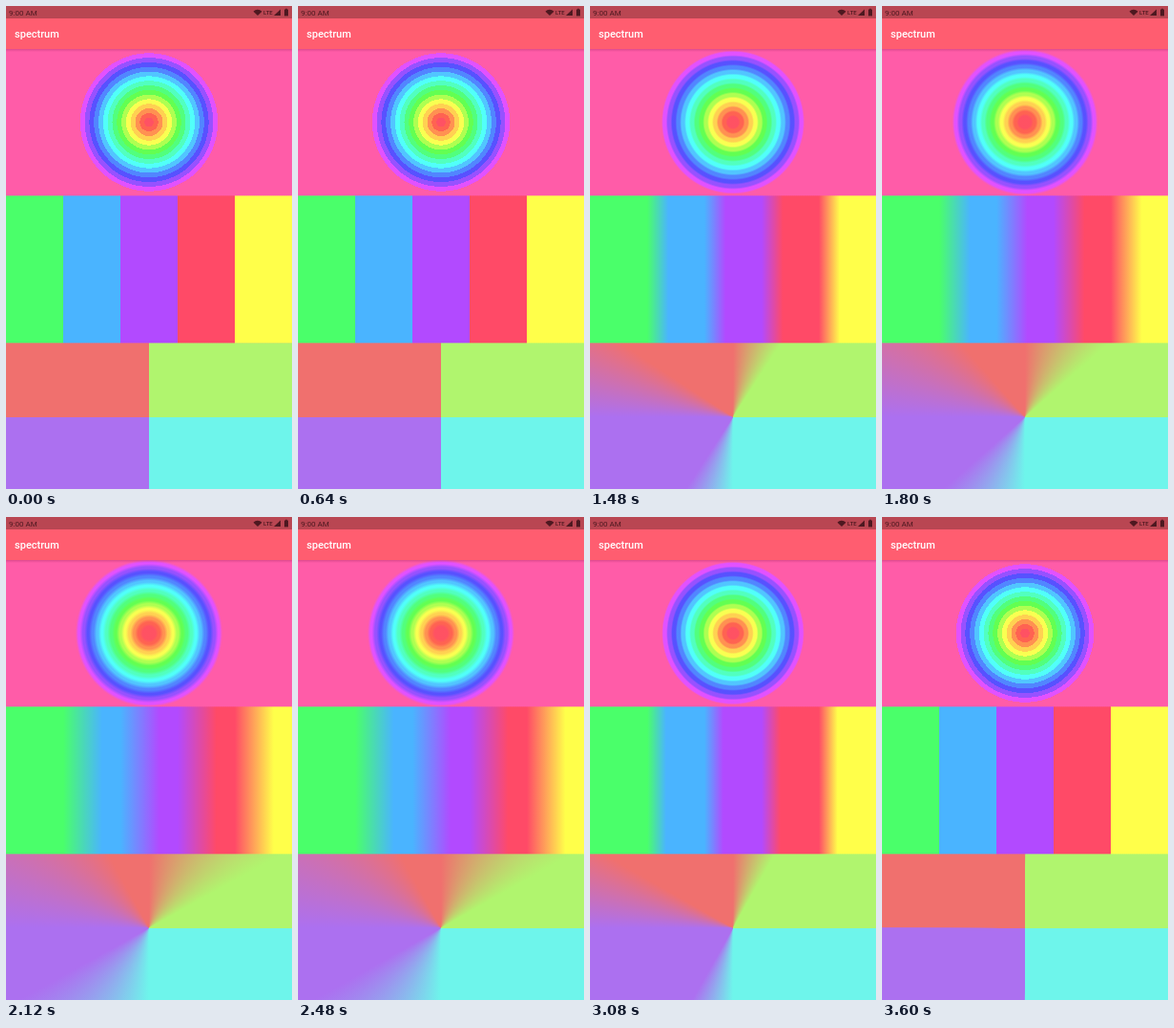
These frames come from a looping animation (300 by 505 pixels, 3.68 s). An HTML page with a canvas:

```html
<!DOCTYPE html>
<html lang="en">
<head>
<meta charset="utf-8">
<title>spectrum</title>
<style>
  html, body { margin: 0; width: 100%; height: 100%; overflow: hidden; background: #ff5ca8; }
  canvas { display: block; width: 300px; height: 505px; }
</style>
</head>
<body>
<canvas id="stage"></canvas>
<script>
const W = 300, H = 505, LOOP = 3680, STEP = 40;
const canvas = document.getElementById('stage');
const ctx = canvas.getContext('2d');
const dpr = window.devicePixelRatio || 1;
canvas.width = W * dpr;
canvas.height = H * dpr;
ctx.scale(dpr, dpr);

const PINK = '#ff5ca8';
const BANDS = ['#4aff6a', '#4ab4ff', '#b24aff', '#ff4a67', '#ffff4a'];
const SECTORS = ['#6ef5eb', '#ac70f0', '#f0706e', '#b0f56e'];
const HUES = [354, 6, 22, 44, 62, 88, 114, 135, 158, 178, 200, 222, 242, 264, 290];
const RINGS = [...HUES.map(h => `hsl(${h}, 100%, 66%)`), PINK];

// [ms, smoothness]: 0 is hard edges, 1 is fully blended
const KEYS = [[0, 0], [880, 0], [1040, .06], [1480, .37], [2120, .68],
              [2400, .7], [2760, .53], [3080, .33], [3600, .005], [LOOP, 0]];

function slope(i) {
  if (i < 2 || i > KEYS.length - 3) return 0;
  const [a, b] = [KEYS[i - 1], KEYS[i + 1]];
  return (b[1] - a[1]) / (b[0] - a[0]);
}

// Cubic Hermite curve through the keys
function smoothness(t) {
  let i = 0;
  while (i < KEYS.length - 2 && t >= KEYS[i + 1][0]) i++;
  const [t0, a] = KEYS[i], [t1, b] = KEYS[i + 1];
  const d = t1 - t0, u = (t - t0) / d, v = 1 - u;
  const y = v * v * (1 + 2 * u) * a + u * u * (3 - 2 * u) * b
          + d * u * v * (v * slope(i) - u * slope(i + 1));
  return Math.min(1, Math.max(0, y));
}

// Each colour begins to fade in at its own slot and takes s slots to do so
function addStops(gradient, colors, s, shift = 0) {
  const n = colors.length;
  const stop = (p, c) => gradient.addColorStop(Math.min(1, p / n), c);
  stop(0, colors[0]);
  for (let i = 1; i < n; i++) {
    stop(i + shift, colors[i - 1]);
    stop(i + shift + s, colors[i]);
  }
  return gradient;
}

function rect(x, y, w, h, fill) {
  ctx.fillStyle = fill;
  ctx.fillRect(x, y, w, h);
}

function text(str, x, y, font, fill) {
  ctx.font = font + ' Roboto, sans-serif';
  ctx.fillStyle = fill;
  ctx.fillText(str, x, y);
}

function shape(...points) {
  ctx.beginPath();
  points.forEach(([x, y]) => ctx.lineTo(x, y));
  ctx.fill();
}

function drawBars() {
  rect(0, 0, W, 13, '#b94652');
  rect(0, 13, W, 32, '#ff5d70');
  const shadow = ctx.createLinearGradient(0, 45, 0, 48);
  shadow.addColorStop(0, 'rgba(90, 0, 40, .2)');
  shadow.addColorStop(1, 'rgba(90, 0, 40, 0)');
  rect(0, 45, W, 3, shadow);

  const ink = '#4d1820';
  text('9:00 AM', 3, 9.6, '400 8px', ink);
  text('LTE', 270, 9, '500 6px', ink);
  ctx.beginPath();
  ctx.moveTo(264, 10);
  ctx.arc(264, 10, 6.2, -Math.PI * .76, -Math.PI * .24);
  ctx.fill();
  shape([281, 10], [288, 10], [288, 3.5]);
  rect(292, 3.6, 4, 6.8, ink);
  rect(293, 2.8, 2, 1, ink);
  text('spectrum', 9, 33, '500 11px', '#fff');
}

function draw(t) {
  const s = smoothness(t);
  const cx = 150, ringY = 121.5, radius = 77, sweepY = 429.7;

  const rings = ctx.createRadialGradient(cx, ringY, 0, cx, ringY, radius);
  rect(0, 45, W, 153.5, addStops(rings, RINGS, s, s * .6));

  const bands = ctx.createLinearGradient(0, 0, W, 0);
  rect(0, 198.5, W, 154, addStops(bands, BANDS, s));

  const sweep = ctx.createConicGradient(0, cx, sweepY);
  rect(0, 352.5, W, H - 352.5, addStops(sweep, SECTORS, s));

  drawBars();
}

function tick(now) {
  const t = now % LOOP;
  draw(t - t % STEP);
  requestAnimationFrame(tick);
}
draw(0);
requestAnimationFrame(tick);
</script>
</body>
</html>
```
